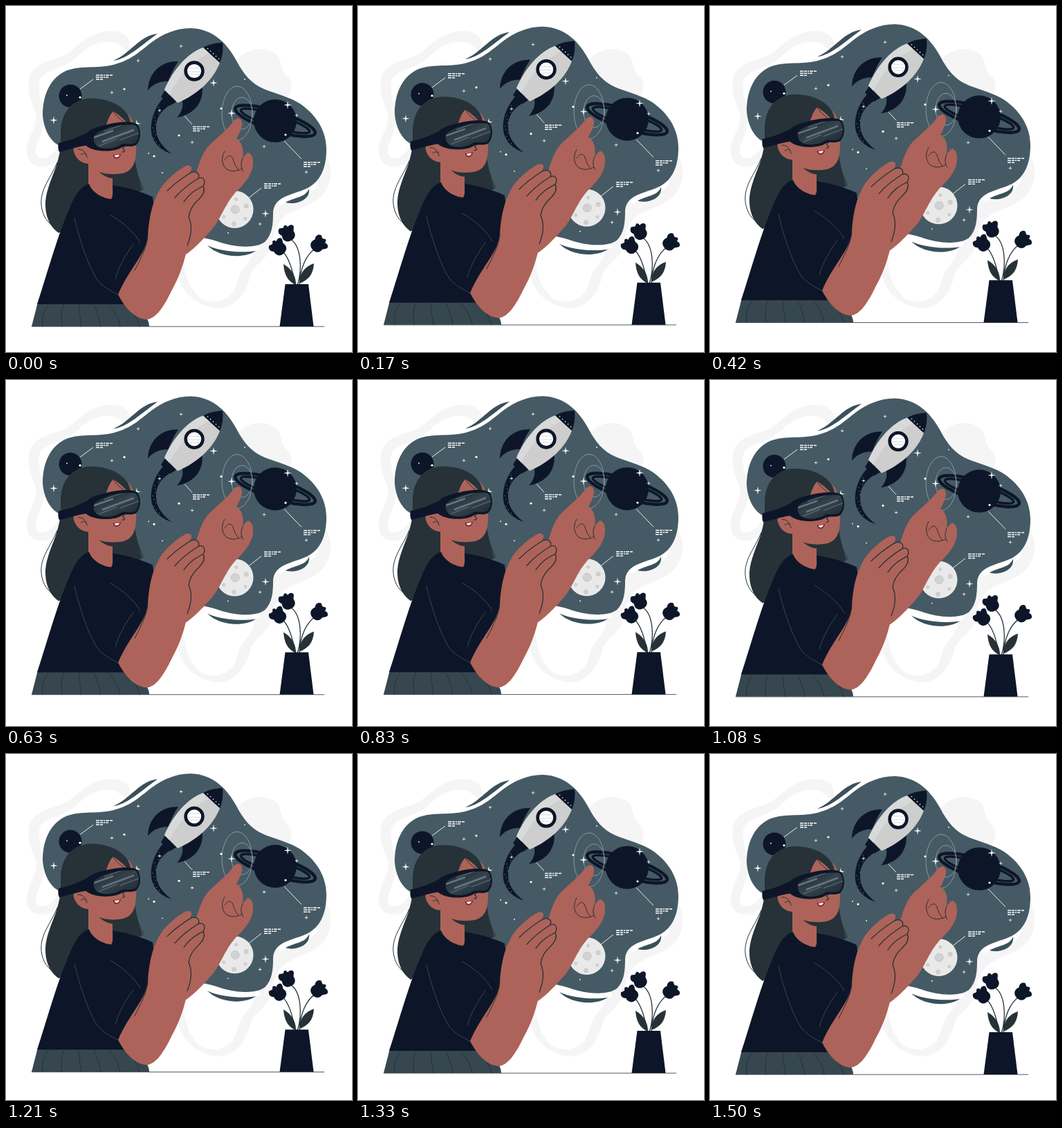
An HTML page for the animation above (1.54 s loop, 500 by 500 pixels).

```html
<!DOCTYPE html>
<html lang="en">
<head>
<meta charset="utf-8">
<title>Virtual space</title>
<style>
html, body { margin: 0; width: 100%; height: 100%; overflow: hidden; background: #fff; }
svg { display: block; width: 100%; height: 100%; }
.navy { fill: #0d1628; }
.hair { fill: #263238; }
.skin { fill: #ad6359; }
.pale { fill: #f5f5f5; }
.line { fill: none; stroke: #263238; stroke-width: 1.3; stroke-linecap: round; stroke-linejoin: round; }
.slim { stroke-width: 1; }
.fold { fill: none; stroke: #37474f; stroke-linecap: round; }
.thin { fill: none; stroke: #fff; stroke-width: .9; }
</style>
</head>
<body>
<svg viewBox="0 0 500 500">
  <defs>
    <linearGradient id="tint" x2="1" y2="1">
      <stop stop-color="#1c2733"/>
      <stop offset=".5" stop-color="#34434c"/>
      <stop offset="1" stop-color="#1a2531"/>
    </linearGradient>
    <path id="lens" d="M128 187C140 175 170 170 187 172C194 178 193 192 187 198C179 202 171 197 165 201C156 207 138 208 131 202C126 197 126 191 128 187Z"/>
    <clipPath id="inLens"><use href="#lens"/></clipPath>
    <path id="tulip" d="M0 0C-9 0 -11 -7 -9 -12C-13 -16 -12 -21 -8 -23C-4 -22 -3 -20 -1 -23C1 -25 3 -24 4 -20C7 -22 11 -21 12 -18C12 -14 9 -13 9 -10C10 -5 7 0 0 0Z"/>
  </defs>

  <!-- still backdrop -->
  <g class="pale">
    <path d="M176 66C186 48 171 35 150 36C121 37 106 57 90 68C72 79 47 78 36 98C26 118 38 140 43 155C47 172 30 190 30 210C30 230 46 235 60 231C74 227 82 214 85 200L75 204C64 220 48 226 43 213C42 196 57 182 55 160C53 140 44 120 49 106C56 91 82 92 102 74C120 56 140 47 160 54Z"/>
    <path d="M325 90C340 62 365 58 385 66C401 73 394 90 405 100C416 109 414 122 406 134L345 122Z"/>
    <path d="M462 215C472 232 472 252 460 270C447 288 421 291 404 303C388 315 388 329 383 346C379 366 360 372 354 387C349 408 340 426 318 435C294 442 264 425 253 402C247 389 247 375 248 360L257 362C257 386 264 408 281 422C298 433 325 426 332 406C336 391 339 382 350 370C361 356 358 345 367 325L385 285L440 255Z"/>
  </g>

  <g id="float">
    <!-- cloud of space -->
    <path d="M158 83C183 78 200 54 222 44M394 285C416 275 440 272 447 255M285 340C310 349 340 355 366 348" fill="none" stroke="#fff" stroke-width="8"/>
    <path fill="#455a64" d="M267 32C300 33 320 55 333 79C343 98 354 112 373 120C396 129 420 134 436 150C453 165 463 185 463 207C463 233 455 253 436 263C415 273 388 274 386 298C386 315 385 330 374 341C360 351 330 349 305 340C285 334 265 330 240 330L130 290L80 203C63 197 54 176 53 157C53 130 63 106 84 95C104 85 130 91 155 85C182 78 195 64 211 52C226 41 245 32 267 32Z"/>
    <path fill="#3a505b" d="M155 79C175 77 195 57 219 40C194 42 178 70 155 79ZM404 284C416 276 432 278 438 264C440 280 420 288 404 284ZM291 346C310 355 340 357 361 354C342 366 308 363 291 346Z"/>
    <circle class="navy" cx="93" cy="130" r="16.5"/>

    <!-- rocket -->
    <path class="navy" d="M228 132C212 150 206 173 212 190C217 203 228 210 240 214C226 204 217 192 217 177C216 163 224 151 237 143Z"/>
    <g id="embers" fill="#b8c2c9"></g>
    <path class="navy" d="M249 80C224 79 206 96 205 122C212 113 224 108 234 109C239 98 242 90 249 80ZM283 112C287 135 276 156 247 161C255 152 257 143 254 135C265 130 275 122 283 112ZM231 120L247 138L237 144L224 131Z"/>
    <path fill="#cecece" d="M285 60C262 68 241 93 229 121L248 140C278 127 300 106 309 82Z"/>
    <path fill="#d9d9d9" d="M285 60C262 68 241 93 229 121L236 128C249 103 270 78 294 68Z"/>
    <path class="navy" d="M285 60C294 55 304 53 313 53C314 63 313 73 309 82Z"/>
    <circle cx="272" cy="94" r="12.4" fill="#fff" stroke="#0d1628" stroke-width="4.6"/>
    <path d="M264 90h16M263 95h18M265 99h14" stroke="#dadada"/>
    <g id="rivets" fill="#fff"></g>

    <!-- ringed planet -->
    <g fill="none" stroke="#0d1628" transform="rotate(17.500 389 166)">
      <ellipse cx="389" cy="166" rx="60.500" ry="14" stroke-width="4.500"/>
      <ellipse cx="389" cy="166" rx="52" ry="9" stroke-width="3.500"/>
    </g>
    <circle class="navy" cx="389" cy="166" r="31"/>
    <g fill="none" stroke="#cfd8dc" stroke-width=".7" opacity=".7">
      <ellipse cx="334" cy="155" rx="22" ry="39"/>
      <ellipse cx="341" cy="155" rx="15" ry="23"/>
    </g>

    <!-- moon -->
    <circle cx="330.500" cy="294" r="27" fill="#e9e9e9"/>
    <g id="craters" fill="#d2d2d2" stroke="#bdbdbd" stroke-width=".7"></g>

    <path class="thin" d="M107 120L126 106M258 159L269 171M402 195L427 221M350 278L369 263"/>
    <g id="labels" fill="none" stroke="#fff" stroke-width="1.500" stroke-dasharray="5 1 4 1 2 1"></g>
    <g id="stars" fill="#fff"></g>

    <!-- floor and plant -->
    <path d="M37 463.200H460" stroke="#263238" stroke-width=".8"/>
    <path class="line" d="M421 404C429 378 426 346 411 337M418 404C415 385 409 364 400 355M424 404C425 378 434 360 446 351"/>
    <path class="hair" d="M419 403C407 398 402 388 401 373C413 380 419 390 419 403ZM424 401C424 385 433 376 445 372C444 388 437 396 424 401Z"/>
    <path class="navy" d="M403.500 402H437L444.500 463H395.500Z"/>
    <g id="tulips" class="navy"></g>

    <!-- hair behind -->
    <path class="hair" d="M83 165C80 195 79 213 72 233C64 254 56 272 57 290C58 308 65 320 76 328L130 300L197 266C190 244 188 233 184 210L120 180Z"/>
    <path class="line slim" d="M74 226C64 250 49 265 51 288C53 305 61 314 71 320M183 215C188 240 192 250 199 265"/>

    <!-- skirt -->
    <path fill="#37474f" d="M46 428L37 463H207C207 455 200 440 178 428Z"/>
    <g id="pleats" class="line slim"></g>

    <!-- neck and top -->
    <path class="skin" d="M119 200V259C124 272 140 281 154 280V238L180 200Z"/>
    <path class="hair" d="M130 235C142 242 156 244 171 242C164 246 159 247 154 249C144 248 136 242 130 235Z"/>
    <path class="navy" d="M120 257C124 269 139 278 152 279C155 275 155 267 154 259C174 262 196 268 212 276C216 305 213 340 200 370L166 417L181 431H45C60 385 75 330 92 292C100 272 108 261 120 257Z"/>
    <path class="fold" d="M99 307C107 340 119 376 132 396C140 406 152 412 162 417M151 302C168 312 185 326 194 342M184 344C172 361 163 377 158 394"/>

    <!-- face -->
    <path class="skin" d="M118 170L146 150L178 158C187 170 189 185 188 205C188 226 184 238 168 242C148 245 128 242 120 227Z"/>
    <path class="hair" d="M79 184C79 157 92 138 115 134C139 131 165 140 175 156C180 163 181 170 179 174C170 162 161 156 155 152C149 158 147 166 144 174L121 181L119 207C105 199 94 205 96 214L79 215Z"/>
    <path class="skin" d="M119 204C108 193 95 199 98 211C102 223 111 228 120 228Z"/>
    <path class="line slim" d="M104 207C111 206 116 212 117 219M108 215C111 212 114 213 116 215M155 152C160 161 168 166 175 171"/>
    <path class="line" d="M172 202C169 205 167 206 170 207C172 209 172 211 168 211" stroke="#0d1628"/>
    <path d="M154 215C159 216 163 215 166 213C166 219 161 222 157 220Z" fill="#7e2d38"/>
    <path d="M157 216L164 215C163 219 158 220 157 216Z" fill="#fff"/>

    <!-- goggles -->
    <path class="navy" d="M76 198C92 194 105 190 119 182V201C105 203 92 207 77 211C75 207 75 202 76 198Z"/>
    <path class="navy" d="M113 190C117 178 131 175 147 171C163 167 183 166 190 171C196 181 195 194 188 201C180 205 174 201 168 204C156 212 130 211 119 204C112 200 111 195 113 190Z"/>
    <use href="#lens" fill="url(#tint)"/>
    <g clip-path="url(#inLens)" fill="none" stroke="#66757e">
      <path d="M127 190L155 180M139 196L185 179" stroke-width="2.500"/>
      <path d="M135 202L160 192M164 194L193 183M142 181L170 171"/>
    </g>

    <!-- pointing arm -->
    <path class="skin" d="M260 359C273 350 289 333 300 320C312 304 316 287 332 269C347 255 358 240 357 225C357 217 354 213 350 212C347 212 346 216 342 220C344 207 341 196 333 192C337 184 342 175 341 168C339 161 334 161 329 166C319 180 306 189 294 201C284 211 278 229 274 245L235 300Z"/>
    <path class="line slim" d="M316 210C310 219 312 233 321 237C329 240 336 238 341 235M316 222C321 216 325 214 328 221C330 228 332 233 336 237M342 220C339 227 339 234 343 239"/>

    <!-- near arm -->
    <path class="skin" d="M205 332C207 302 212 283 223 264C233 249 249 237 260 231C268 229 271 234 265 242C273 237 281 241 278 249C286 246 289 253 285 260C288 266 285 273 279 279C270 287 265 295 264 305C271 318 268 339 260 358C256 374 251 390 240 410C228 435 217 452 203 453C188 452 174 440 162 417C178 379 203 358 205 332Z"/>
    <path class="line" d="M265 242C254 249 244 256 233 267M278 249C265 257 255 264 244 277M285 260C274 266 266 270 257 283M265 242C273 237 281 241 278 249C286 246 289 253 285 260C288 266 285 273 279 279C270 287 265 295 264 305C270 318 268 331 262 346"/>
    <path class="line slim" d="M205 333C203 350 194 366 186 382"/>
  </g>
</svg>
<script>
const $ = id => document.getElementById(id);
const fill = (id, items, make) => { $(id).innerHTML = items.map(make).join(""); };
const range = n => Array.from({ length: n }, (_, i) => i);
const dot = (x, y, r) => `<circle cx="${x}" cy="${y}" r="${r}"/>`;
const sparkle = r => ([x, y]) => {
  const k = r * 0.84, s = r - k;
  return `<path d="M${x} ${y - r}l${s} ${k} ${k} ${s} ${-k} ${s} ${-s} ${k} ${-s} ${-k} ${-k} ${-s} ${k} ${-s}z"/>`;
};

const big = [[300, 111], [69, 165], [326, 155], [407, 143], [375, 300], [189, 170]];
const small = [[191, 79], [253, 58], [153, 125], [269, 197], [420, 158], [434, 240], [367, 315], [373, 203], [222, 151]];
const specks = [[171, 120], [311, 148], [250, 187], [214, 217], [404, 186], [107, 132]];
const dust = [[206, 213], [226, 241], [321, 328], [345, 106], [88, 129]];
$("stars").innerHTML = [
  ...big.map(sparkle(5.8)),
  ...small.map(sparkle(3.2)),
  ...specks.map(p => dot(...p, 1.6)),
  ...dust.map(p => dot(...p, 0.9))
].join("");

fill("labels", [[130, 100], [270, 174.5], [430, 226], [373, 257]],
  ([x, y]) => `<path d="M${x} ${y}h24m-24 3h18m-18 3h11"/>`);
fill("rivets", range(5), i => dot(291.5 + i * 4, 61.5 + i * 3.7, 0.8));
fill("embers", range(12), i => dot(221 - 9 * Math.sin(i / 4) + i % 3 * 2, 146 + i * 5, 0.5));
fill("craters", range(7), i => {
  const a = i * 1.05 - 1.5, d = i ? 18 : 3;
  return dot(331 + d * Math.cos(a), 297 + d * Math.sin(a), i ? 2 + i % 2 : 6);
});
fill("pleats", range(6), i => {
  const x = 61 + i * 22, foot = 53 + i * 28;
  return `<path d="M${x} 432Q${foot - 3} 446 ${foot} 463"/>`;
});
fill("tulips", [[412, 339, -25], [402, 357, -45], [443, 352, 50]],
  ([x, y, turn]) => `<use href="#tulip" transform="translate(${x} ${y}) rotate(${turn})"/>`);

const LOOP = 1540, RISE = 740, HEIGHT = 10;
const scene = $("float");
const start = performance.now();
function draw(now) {
  const t = Math.max(0, now - start) % LOOP;
  const lift = HEIGHT * Math.max(0, 1 - Math.abs(t - RISE) / RISE);
  scene.setAttribute("transform", `translate(0 ${-lift.toFixed(3)})`);
  requestAnimationFrame(draw);
}
draw(start);
</script>
</body>
</html>
```
